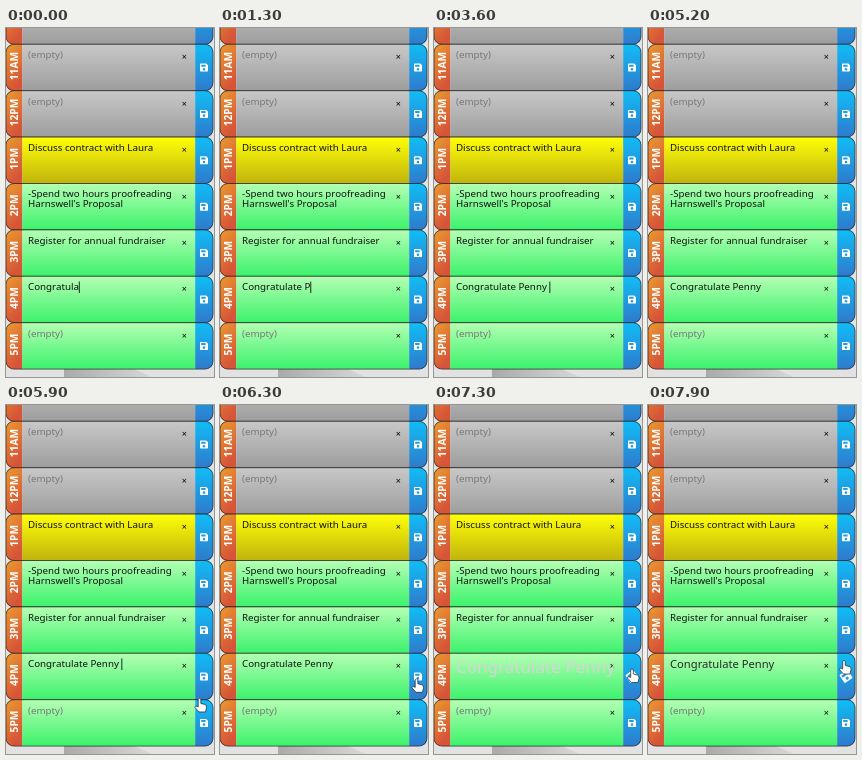
Write an HTML page that moves like this. It is 208x349 px and loops after 8000 ms.

```html
<!DOCTYPE html>
<html lang="en">
<head>
<meta charset="utf-8">
<title>Day planner</title>
<style>
  html, body { margin: 0; width: 100%; height: 100%; overflow: hidden; }
  svg { display: block; width: 208px; height: 349px; font: 9.75px "Noto Sans", sans-serif; }
  text { white-space: pre; }
  .hour { font-weight: 700; font-size: 10.2px; fill: #fff; text-anchor: middle; }
  .close { font-size: 9px; text-anchor: middle; }
</style>
</head>
<body>
<svg id="stage" viewBox="0 0 208 349">
  <defs>
    <linearGradient id="hour" x2=".4" y2="1"><stop stop-color="#eb9a2f"/><stop offset="1" stop-color="#d65438"/></linearGradient>
    <linearGradient id="save" x2="0" y2="1"><stop stop-color="#10bdf6"/><stop offset="1" stop-color="#2f7acc"/></linearGradient>
    <linearGradient id="past" x2="0" y2="1"><stop stop-color="#c8c8c8"/><stop offset="1" stop-color="#9d9d9d"/></linearGradient>
    <linearGradient id="present" x2="0" y2="1"><stop stop-color="#ffff08"/><stop offset="1" stop-color="#c0b30c"/></linearGradient>
    <linearGradient id="future" x2="0" y2="1"><stop stop-color="#b5ffb4"/><stop offset="1" stop-color="#3bf26b"/></linearGradient>
    <linearGradient id="shade"><stop stop-color="#aaa"/><stop offset="1" stop-color="#d8d8d8"/></linearGradient>
    <clipPath id="body"><path d="M16 248H189V294H16Z"/></clipPath>
  </defs>
  <rect width="208" height="349" fill="#e2e2e2"/>
  <path d="M58 349V341H128L146 349Z" fill="url(#shade)"/>
  <g id="rows"></g>
  <g clip-path="url(#body)"><text id="note" x="22"></text></g>
  <path id="caret" d="M0 253.5V265" stroke="#111" stroke-width=".9"/>
  <path id="hand" d="M-1.3 8V.8Q0-1 1.3.8V5L5.4 6Q7.3 6.5 7 9L6 13.5H-.5L-4.6 9Q-4.3 6.6-1.3 8.6Z"
        fill="#fff" stroke="#222" stroke-width=".7"/>
</svg>
<script>
const $ = id => document.getElementById(id);
const TOP = 16.3, PITCH = 46.4, MESSAGE = "Congratulate Penny ";
const schedule = [
  ["", "past"],
  ["11AM", "past"],
  ["12PM", "past"],
  ["1PM", "present", "Discuss contract with Laura"],
  ["2PM", "future", "-Spend two hours proofreading", "Harnswell's Proposal"],
  ["3PM", "future", "Register for annual fundraiser"],
  ["4PM", "future", ""],
  ["5PM", "future"]
];

const drawRow = ([hour, tense, ...lines], i) => {
  const empty = !lines.length;
  const text = (empty ? ["(empty)"] : lines).map((line, n) =>
    `<text x="22" y="${13.9 + n * 9.8}" fill="${empty ? "#777" : "#111"}">${line}</text>`).join("");
  return `<g transform="translate(0 ${TOP + PITCH * (i - 1)})">
    <path d="M16.3 0H8Q0 0 0 8V38.4Q0 46.4 8 46.4H16.3Z" fill="url(#hour)"/>
    <path d="M16.3 0H189.2V46.4H16.3Z" fill="url(#${tense})"/>
    <path d="M189.2 0H199Q207 0 207 8V38.4Q207 46.4 199 46.4H189.2Z" fill="url(#save)"/>
    <rect width="207" height="46.4" rx="8" fill="none" stroke="#1c1c1c" stroke-opacity=".75" stroke-width=".9"/>
    <text class="hour" transform="translate(11.8 21.8) rotate(-90)">${hour}</text>
    ${text}<text class="close" x="178.3" y="16">×</text>
    <g transform="translate(198 23.2)"><path class="disk" fill="#fff" fill-rule="evenodd"
      d="M-4-3.3Q-4-4-3.3-4H2.2L4-2.2V3.3Q4 4 3.3 4H-3.3Q-4 4-4 3.3ZM-2.8-2.8V-.8H1.6V-2.8ZM0 .4A1.3 1.3 0 0 0 0 3A1.3 1.3 0 0 0 0 .4Z"/></g>
  </g>`;
};
$("rows").innerHTML = schedule.map(drawRow).join("");
const activeDisk = document.querySelectorAll(".disk")[6];

const typing = [[0, 10], [500, 11], [600, 12], [700, 13], [1300, 14], [1600, 15], [1700, 16], [1900, 18], [3600, 19]];
const caretToggles = [2300, 2800, 3300, 3600, 4100, 4700, 5200, 5700, 6200];
const pointer = [[5700, 186, 330], [5900, 193.5, 293.5], [6500, 198, 264], [7700, 198, 264], [7900, 196, 255.5]];

function pointerAt(t) {
  const next = pointer.findIndex(p => p[0] > t);
  if (next < 0) return pointer.at(-1).slice(1);
  const [t0, x0, y0] = pointer[next - 1], [t1, x1, y1] = pointer[next];
  const k = (t - t0) / (t1 - t0);
  return [x0 + (x1 - x0) * k, y0 + (y1 - y0) * k];
}

function draw(t) {
  const note = $("note"), saved = t >= 7000;
  const scale = saved ? Math.min(2, 1 + (8050 - t) / 1000) : 1;
  const grey = saved ? Math.min(255, 285 * (scale - 1)) : 17;
  note.textContent = MESSAGE.slice(0, typing.findLast(k => k[0] <= t)[1]);
  note.style.fontSize = 9.75 * scale + "px";
  note.setAttribute("y", 262.3 + (scale - 1) * 8);
  note.setAttribute("fill", `rgb(${grey},${grey},${grey})`);

  const caretOn = caretToggles.filter(time => time <= t).length % 2 === 0;
  $("caret").style.display = caretOn ? "" : "none";
  $("caret").setAttribute("transform", `translate(${22.4 + note.getComputedTextLength()} 0)`);

  const hover = Math.max(0, Math.min(1, (t - 6300) / 300));
  activeDisk.setAttribute("transform", `rotate(${-35 * hover}) scale(${1 + .2 * hover})`);

  const visible = t >= pointer[0][0];
  $("hand").style.display = visible ? "" : "none";
  if (visible) $("hand").setAttribute("transform", `translate(${pointerAt(t)})`);
}

const start = performance.now();
(function tick() {
  draw((performance.now() - start) % 8000);
  requestAnimationFrame(tick);
})();
</script>
</body>
</html>
```
